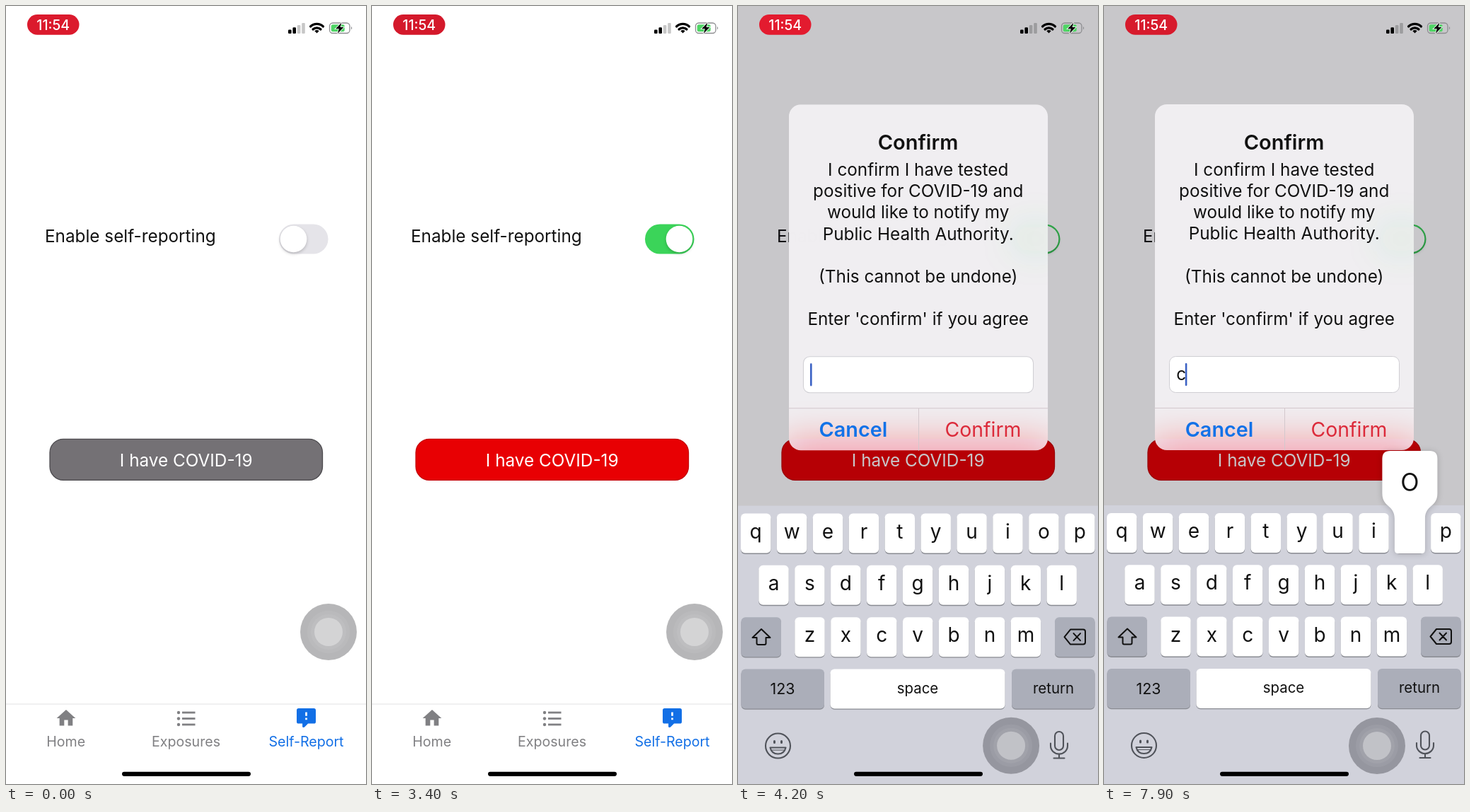
Recreate the animation shown at these times as an HTML page. Size 509 by 1100 pixels, loop 8 s.

```html
<!DOCTYPE html>
<html lang="en">
<head>
<meta charset="utf-8">
<title>Self-report</title>
<style>
@property --p { syntax: "<number>"; inherits: true; initial-value: 0; }
html, body { margin: 0; width: 100%; height: 100%; overflow: hidden; background: #fff; }
svg {
  display: block; width: 100vw; height: 100vh;
  font-family: Inter, Roboto, sans-serif; font-size: 24.3px; fill: #111;
  animation: present 8s infinite;
}
.mid { text-anchor: middle; }
.line { fill: none; stroke-linecap: round; stroke-linejoin: round; }

/* --p runs from 0 to 1 on a critically damped spring */
@keyframes present {
  0% { --p: 0; }
  46.5% { --p: 0; animation-timing-function: linear(0, .264, .594, .801, .908, .96, .983, .993, .997, .999, 1); }
  53.35%, 100% { --p: 1; }
}
.dim { opacity: calc(var(--p) * .22); }
.fade { opacity: var(--p); }
.veil { opacity: calc(var(--p) * (.6 + .4 * var(--p))); }
.card {
  transform-origin: 255px 383.5px;
  transform: translateY(calc((1 - var(--p)) * 166.5px)) scale(calc(1.2 - .2 * var(--p)));
}
.keyboard { transform: translateY(calc((1 - var(--p)) * 394px)); }
.assist { transform: translate(calc(456px - 70px * var(--p)), calc(885px + 161px * var(--p))); }

.track { animation: track 8s infinite; }
@keyframes track { 0%, 20% { fill: #e5e4e9; } 23%, 100% { fill: #3bd459; } }
.thumb { animation: thumb 8s infinite; filter: drop-shadow(0 2px 2px #0003); }
@keyframes thumb { 0%, 20% { transform: none; } 23%, 100% { transform: translateX(28px); } }
.report { animation: report 8s step-end infinite; }
@keyframes report {
  0% { fill: #747175; stroke: #4c4a4e; }
  21.25%, 100% { fill: #e80003; stroke: #c40006; }
}

.pill { animation: pulse 1s ease-in-out -.4s infinite alternate; }
@keyframes pulse { from { fill: #d2192a; } to { fill: #ec1c32; } }
.blink { animation: blink 1s -.2s infinite; }
@keyframes blink { 0%, 50% { opacity: 1; } 70%, 85% { opacity: 0; } 100% { opacity: 1; } }

.empty, .typed, .press-c, .press-o { animation: 8s step-end infinite; }
.empty { animation-name: empty; }
.typed { animation-name: typed; }
.press-c { animation-name: press-c; }
.press-o { animation-name: press-o; }
@keyframes empty { 0% { opacity: 1; } 91.25%, 100% { opacity: 0; } }
@keyframes typed { 0% { opacity: 0; } 91.25%, 100% { opacity: 1; } }
@keyframes press-c { 0% { opacity: 0; } 90% { opacity: 1; } 91.9%, 100% { opacity: 0; } }
@keyframes press-o { 0% { opacity: 0; } 97.5%, 100% { opacity: 1; } }
.popup { filter: drop-shadow(0 1px 4px #0003); }
#popups { font-weight: 300; }
</style>
</head>
<body>
<svg viewBox="0 0 509 1100" preserveAspectRatio="none">
  <defs>
    <clipPath id="cardShape"><rect class="card" x="72" y="139" width="366" height="489" rx="17"/></clipPath>
    <filter id="soft" x="-30%" y="-200%" width="160%" height="500%"><feGaussianBlur stdDeviation="25"/></filter>
  </defs>

  <g id="page">
    <rect width="509" height="1100" fill="#fff"/>
    <text x="55" y="333.5">Enable self-reporting</text>
    <rect class="track" x="386" y="308.5" width="69.5" height="42" rx="21"/>
    <circle class="thumb" cx="406.5" cy="329.5" r="18.8" fill="#fff"/>
    <rect class="report" x="62" y="612.3" width="385.5" height="58" rx="19" stroke-width="1.3"/>
    <text class="mid" x="254.7" y="650.5" fill="#fff">I have COVID-19</text>

    <rect y="986" width="509" height="2" fill="#f0f0f1"/>
    <g class="mid" font-size="19.6" fill="#808083">
      <path transform="translate(69 991) scale(1.33)" d="M10 20v-6h4v6h5v-8h3L12 3 2 12h3v8z"/>
      <text x="84.7" y="1047">Home</text>
      <g id="bullets"></g>
      <text x="254.5" y="1047">Exposures</text>
      <g fill="#126fe6">
        <path transform="translate(408.3 990.3) scale(1.35)" d="M13 10H11V6H13ZM13 14H11V12H13ZM20 2H4A2 2 0 0 0 2 4V16A2 2 0 0 0 4 18H8V21A1 1 0 0 0 9 22H9.5Q9.9 22 10.2 21.7L13.9 18H20A2 2 0 0 0 22 16V4A2 2 0 0 0 20 2Z" fill-rule="evenodd"/>
        <text x="424.5" y="1047">Self-Report</text>
      </g>
    </g>
  </g>

  <rect class="dim" width="509" height="1100" fill="#080010"/>

  <g class="veil">
    <g clip-path="url(#cardShape)">
      <rect width="509" height="1100" fill="#f0eef1"/>
      <g filter="url(#soft)">
        <rect x="62" y="612" width="386" height="58" rx="19" fill="#ff0018" opacity=".31"/>
        <rect x="386" y="308" width="69" height="42" rx="21" fill="#3bd459" opacity=".1"/>
      </g>
    </g>
  </g>
  <g class="fade">
    <g class="card">
      <g class="mid">
        <text x="254.5" y="202.5" font-size="29" font-weight="600">Confirm</text>
        <g id="message"></g>
        <text x="163" y="609" font-size="28.8" font-weight="600" fill="#1272e8">Cancel</text>
        <text x="346.5" y="609" font-size="28.4" fill="#dc2a3a">Confirm</text>
      </g>
      <path class="line" d="M72 568.5H438M255.5 568.5V628" stroke="#d3c8cd" stroke-width="1"/>
      <rect x="92.5" y="495.5" width="325" height="51" rx="9" fill="#fff" stroke="#cfced3"/>
      <g class="empty"><rect class="blink" x="102" y="505" width="2.6" height="32" rx="1" fill="#3c62c4"/></g>
      <g class="typed">
        <text x="102.3" y="529">c</text>
        <rect x="114.8" y="505" width="2.6" height="32" rx="1" fill="#3c62c4"/>
      </g>
    </g>
  </g>

  <g class="keyboard">
    <rect y="706" width="509" height="394" fill="#d1d2db"/>
    <g id="keys" class="mid"></g>
    <g class="line" stroke="#111" stroke-width="2">
      <path d="M33 880.5L45.5 892.5H39.5V900.5Q39.5 902.5 37.5 902.5H28.5Q26.5 902.5 26.5 900.5V892.5H20.5Z"/>
      <path d="M470 881H488Q491 881 491 884V899Q491 902 488 902H470L461.5 891.5ZM474.5 886.5L484 896.5M484 886.5L474.5 896.5"/>
    </g>
    <g class="line" stroke="#50535a" stroke-width="2.1">
      <circle cx="56.5" cy="1045.5" r="17.5"/>
      <path d="M45.5 1048H67.5Q65.5 1057 56.5 1057T45.5 1048Z"/>
      <path d="M48 1051.5H65" stroke-width="1"/>
      <path d="M51.5 1039V1041M61.5 1039V1041" stroke-width="3"/>
      <rect x="448" y="1025.5" width="12" height="26" rx="6"/>
      <path d="M442 1042V1045.5A12 11.5 0 0 0 466 1045.5V1042M454 1057V1063M446.5 1063H461.5"/>
    </g>
    <g id="popups" class="mid"></g>
  </g>

  <g class="assist">
    <circle r="40" fill="#00000a" opacity=".285"/>
    <circle r="30" fill="#fff" opacity=".06"/>
    <circle r="25" fill="#fff" opacity=".06"/>
    <circle r="20" fill="#fff" opacity=".34"/>
  </g>

  <rect class="pill" x="30" y="12" width="73.5" height="28.7" rx="14.3"/>
  <text class="mid" x="66.7" y="33.7" font-size="19.6" font-weight="500" fill="#fff">11:54</text>
  <g id="signal"></g>
  <g class="line" stroke="#000" stroke-width="3.2" stroke-linecap="butt">
    <path d="M430.5 29A13 13 0 0 1 448.5 29M434 33A8 8 0 0 1 445 33"/>
    <path d="M439.5 38.5L436.3 35.2Q439.5 32.8 442.7 35.2Z" fill="#000" stroke="none"/>
  </g>
  <rect x="457.5" y="24" width="28.5" height="14.5" rx="4.5" fill="none" stroke="#8d8d90" stroke-width="1.3"/>
  <path d="M488 29Q490.5 31.2 488 33.5Z" fill="#8d8d90"/>
  <rect x="459.7" y="26.2" width="19" height="10" rx="2.5" fill="#4fd565"/>
  <path d="M474.5 23.5L466 32.2H470.8L468.8 39L477.5 30H472.6Z" stroke="#fff" stroke-width="1.6" paint-order="stroke" fill="#000"/>
  <rect x="164" y="1082.7" width="182" height="6.2" rx="3.1" fill="#000"/>
</svg>
<script>
const put = (id, markup) => { document.getElementById(id).innerHTML += markup; };
const rect = (x, y, w, h, r, fill, more = '') =>
  `<rect x="${x}" y="${y}" width="${w}" height="${h}" rx="${r}" fill="${fill}" ${more}/>`;
const text = (x, y, label, size) =>
  `<text x="${x}" y="${y}" font-size="${size}">${label}</text>`;

for (let i = 0; i < 3; i++) {
  const y = 999 + i * 8.5;
  put('bullets', `<circle cx="244" cy="${y}" r="2.2"/>` + rect(249, y - 1.4, 18.5, 2.8, 0, '#808083'));
}

for (let i = 0; i < 4; i++) {
  const h = 5.5 + i * 3.2;
  put('signal', rect(399 + i * 6.4, 39 - h, 4.6, h, 1.2, '#000', `opacity="${i < 2 ? 1 : .22}"`));
}

['I confirm I have tested', 'positive for COVID-19 and', 'would like to notify my',
 'Public Health Authority.', '', '(This cannot be undone)', '', "Enter 'confirm' if you agree"]
  .forEach((line, i) => put('message', text(254.7, 240 + i * 30.1, line, 24.3)));

const PITCH = 50.9;
const rowTop = row => 717 + row * 73.3;
const key = (x, row, w, fill = '#fff') =>
  rect(x, rowTop(row) + 1.4, w, 56, 6, '#898b92') + rect(x, rowTop(row), w, 56, 6, fill);

[['qwertyuiop', 25.2], ['asdfghjkl', 50.5], ['zxcvbnm', 101.5]].forEach(([letters, left], row) =>
  [...letters].forEach((ch, i) => {
    const x = left + i * PITCH;
    put('keys', key(x - 21.2, row, 42.4) + text(x, rowTop(row) + 35, ch, 28));
    if (ch !== 'c' && ch !== 'o') return;
    put('popups', `<g class="press-${ch}"><g transform="translate(${x} ${rowTop(row)})">
      <path class="popup" fill="#fff" d="M-28-88H28Q39-88 39-77V-28C39-8 21.5-12 21.5 8V52Q21.5 57 16.5 57H-16.5Q-21.5 57-21.5 52V8C-21.5-12-39-8-39-28V-77Q-39-88-28-88Z"/>
      ${text(0, -32, ch, 46)}</g></g>`);
  }));

const GREY = '#abaeb9';
put('keys', key(4.5, 2, 56.5, GREY) + key(448, 2, 56.5, GREY)
  + key(4.5, 3, 117.5, GREY) + key(130.5, 3, 247, '#fff') + key(387, 3, 117.5, GREY)
  + text(63, 972.5, '123', 21.4) + text(254, 971, 'space', 20.4) + text(446, 971, 'return', 20.4));
</script>
</body>
</html>
```
